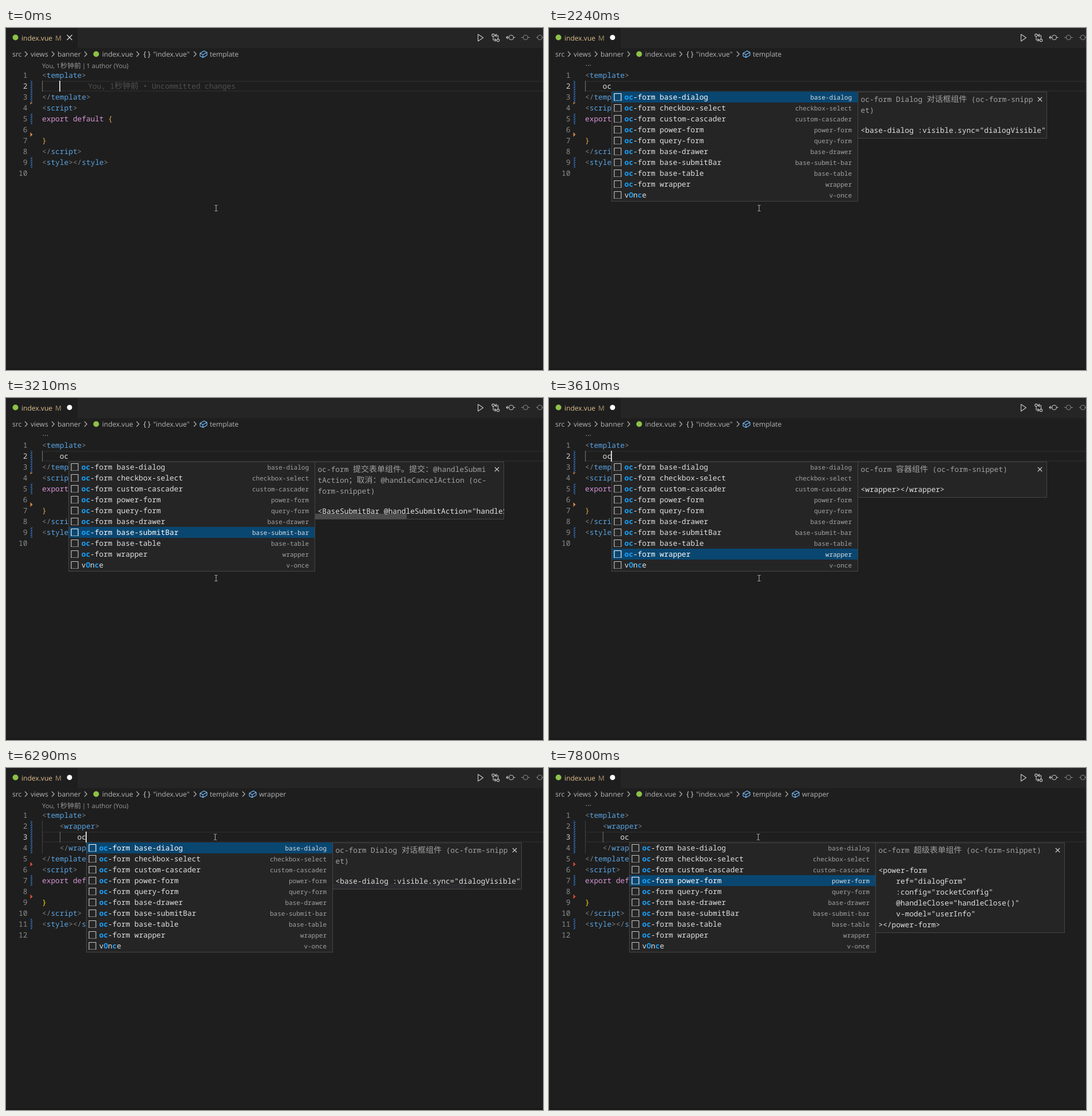
An HTML page for the animation above (8000 ms loop, 938 px wide and 597 px high).

```html
<!DOCTYPE html>
<html lang="zh">
<head>
<meta charset="utf-8">
<title>Snippet completion</title>
<style>
  html, body { margin: 0; width: 100%; height: 100%; overflow: hidden; background: #1e1e1e; }
  svg { display: block; }
  #stage { position: absolute; left: 0; top: 0; }
  text { white-space: pre; text-rendering: geometricPrecision; }
  .mono { font: 12.83px "Noto Sans Mono", "Noto Sans CJK SC", "Noto Sans CJK", monospace; }
  .mono .cjk { font-size: 14px; }
  .ui { font: 12.05px "Open Sans", "Noto Sans CJK SC", "Noto Sans CJK", sans-serif; }
  .line { fill: none; stroke-width: 1.15; stroke-linejoin: round; }
</style>
</head>
<body>
<svg id="stage" width="938" height="597" viewBox="0 0 938 597">
  <defs>
    <pattern id="hatch" width="4" height="4" patternUnits="userSpaceOnUse">
      <path d="M-1 1L1 -1M0 4L4 0M3 5L5 3" stroke="#2f74c8" stroke-width="1.4"/>
    </pattern>
  </defs>
  <g id="scene"></g>
</svg>
<script>
const LOOP = 8000, LEFT = 63, TOP = 73, ROW = 19, CHAR = 7.698;
const LIST_W = 430, PANEL_W = 331;
const GREY = '#808080', BLUE = '#5aa5e4', TEXT = '#e2e2e2', ICON = '#c5c5c5', MATCH = '#18a3ff';

const colX = col => LEFT + col * CHAR;
const rowY = line => TOP + (line - 1) * ROW;
const esc = s => s.replace(/&/g, '&amp;').replace(/</g, '&lt;').replace(/>/g, '&gt;');
const span = (s, fill, extra = '') => `<tspan fill="${fill}" ${extra}>${esc(s)}</tspan>`;
const rect = (x, y, w, h, fill, extra = '') =>
  `<rect x="${x}" y="${y}" width="${w}" height="${h}" fill="${fill}" ${extra}/>`;
const path = (d, stroke = ICON, x = 0, y = 0, extra = '') =>
  `<path class="line" d="${d}" stroke="${stroke}" transform="translate(${x} ${y})" ${extra}/>`;
const ring = (x, y, r, stroke) => `<circle class="line" cx="${x}" cy="${y}" r="${r}" stroke="${stroke}"/>`;
const disc = (x, y, r, fill) => `<circle cx="${x}" cy="${y}" r="${r}" fill="${fill}"/>`;
const rawMono = (x, y, body, extra = '') => `<text class="mono" x="${x}" y="${y}" ${extra}>${body}</text>`;
const mono = (x, y, s, fill, extra = '') => rawMono(x, y,
  esc(s).replace(/[\u3000-\u9fff\uff00-\uffef]+/g, m => `<tspan class="cjk">${m}</tspan>`),
  `fill="${fill}" ${extra}`);
const ui = (x, y, s, fill, extra = '') => `<text class="ui" x="${x}" y="${y}" fill="${fill}" ${extra}>${esc(s)}</text>`;

const SNIPPETS = ['base-dialog', 'checkbox-select', 'custom-cascader', 'power-form', 'query-form',
  'base-drawer', 'base-submitBar', 'base-table', 'wrapper'];
const WORDS = ['obj', 'object', 'ol', 'opt', 'optg', 'optgroup', 'option'];

const PANELS = [
  { doc: ['oc-form Dialog 对话框组件 (oc-form-snipp', 'et)'],
    code: ['<base-dialog :visible.sync="dialogVisible" title="">'] },
  { doc: ['oc-form 多选框组件 (oc-form-snippet)'],
    code: ['<checkbox-select v-model="checkList" :options="list">'] },
  { doc: ['oc-form 级联选择组件 (oc-form-snippet)'],
    code: ['<custom-cascader v-model="value" :options="list">'] },
  { doc: ['oc-form 超级表单组件 (oc-form-snippet)'],
    code: ['<power-form', '    ref="dialogForm"', '    :config="rocketConfig"',
      '    @handleClose="handleClose()"', '    v-model="userInfo"', '></power-form>'] },
  { doc: ['oc-form 查询表单组件 (oc-form-snippet)'],
    code: ['<query-form', '    :config="queryConfig"', '    @handleQuery="handleQuery"',
      '    v-model="queryInfo"', '></query-form>'] },
  { doc: ['oc-form 抽屉组件 (oc-form-snippet)'],
    code: ['<base-drawer :visible.sync="drawerVisible" title="">'] },
  { doc: ['oc-form 提交表单组件。提交：@handleSubmi', 'tAction；取消：@handleCancelAction (oc-', 'form-snippet)'],
    code: ['<BaseSubmitBar @handleSubmitAction="handleSubmitAction">'] },
  { doc: ['oc-form 表格组件 (oc-form-snippet)'],
    code: ['<base-table', '    ref="table"', '    :data="tableData"', '    :columns="columns"',
      '    :total="total"', '    :page.sync="page"', '    :size.sync="size"', '    :loading="loading"',
      '    @change="getList"', '    @select="onSelect"', '    border', '></base-table>'] },
  { doc: ['oc-form 容器组件 (oc-form-snippet)'], code: ['<wrapper></wrapper>'] }
];

// Each entry changes part of the state from its time on.
const TIMELINE = [
  [0, { typed: '', line: 2, col: 4, caret: 1, lens: 1, blame: 1, sel: 0, mouse: [367, 314.5], open: '#e2a94a', close: '#e2a94a' }],
  [380, { caret: 0 }],
  [920, { caret: 1 }],
  [1380, { typed: 'o', dirty: 1 }],
  [1450, { list: 1, hand: 1 }],
  [1510, { panel: 1 }],
  [1580, { typed: 'oc', hand: 0 }],
  [1720, { blame: 0 }],
  [2110, { caret: 0 }],
  [2180, { lens: 0 }],
  [2320, { sel: 1 }],
  [2460, { sel: 2, thumb: [320, '#38383a'] }],
  [2600, { sel: 3, caret: 1 }],
  [2790, { sel: 4, thumb: 0 }],
  [3000, { sel: 5 }],
  [3140, { sel: 6, caret: 0, thumb: [160, '#4b4b4c'] }],
  [3340, { sel: 7, thumb: 0 }],
  [3540, { sel: 8 }],
  [3610, { caret: 1 }],
  [4090, { list: 0, panel: 0, sel: 0, wrapped: 1, typed: '', col: 13, open: '#ffd700' }],
  [4490, { crumb: 1 }],
  [4620, { caret: 0 }],
  [5080, { caret: 1 }],
  [5220, { split: 1, line: 3, col: 8, lens: 1, blame: 1, mouse: [365.5, 120.5], close: '#ffd700' }],
  [5620, { caret: 0 }],
  [6080, { typed: 'o', caret: 1 }],
  [6150, { list: 1 }],
  [6220, { typed: 'oc', blame: 0 }],
  [6290, { panel: 1, thumb: [232, '#2b2b2d'] }],
  [6760, { caret: 0, thumb: 0 }],
  [6830, { lens: 0 }],
  [7270, { caret: 1 }],
  [7340, { sel: 1 }],
  [7580, { sel: 2 }],
  [7800, { sel: 3, caret: 0 }]
];

function crumbs(s) {
  const color = '#b4b4b4';
  const cube = x => path('M-6 -1.5L1 -5.5 6 -3V2L-1 6 -6 3.5ZM-6 -1.5L-1 1 6 -3M-1 1V6', '#75beff', x, 45.5);
  const items = [[11, 'src'], [43, 'views'], [90, 'banner'], [168, 'index.vue'], [257, '"index.vue"'], [356, 'template']];
  const chevrons = [35, 82, 139, 230, 330];
  if (s.crumb) { items.push([442, 'wrapper']); chevrons.push(415); }
  return items.map(([x, name]) => ui(x, 50, name, color)).join('') +
    chevrons.map(x => path('M-2 -4.5L2.3 0 -2 4.5', color, x, 45.5)).join('') +
    disc(157.5, 45.5, 5, '#8dc149') + mono(238.5, 49.5, '{}', ICON) +
    cube(345) + (s.crumb ? cube(431) : '');
}

function chrome(s) {
  const dim = '#858585';
  return rect(0, 0, 938, 597, '#1e1e1e') + rect(125, 0, 813, 35, '#252526') + rect(0, 594, 938, 3, '#191919') +
    disc(16.5, 16.5, 5, '#8dc149') + ui(27, 21.5, 'index.vue', '#e2c08d') +
    ui(86, 21.5, 'M', '#e2c08d', 'opacity=".75"') +
    (s.dirty ? disc(111, 16.5, 4.5, '#fff') : path('M-4.5 -4.5L4.5 4.5M4.5 -4.5L-4.5 4.5', '#e0e0e0', 111, 16.5)) +
    path('M824.5 11L833.5 17 824.5 23Z') +
    ring(851, 12.5, 2.2, ICON) + ring(859.5, 21.5, 2.2, ICON) +
    path('M851 15V21H855.5M853.5 18.5L856 21 853.5 23.5M859.5 19V13H855M857 10.5L854.5 13 857 15.5') +
    ring(882.5, 16.5, 4, ICON) + path('M878.5 16.5H874M876.5 14L874 16.5 876.5 19M886.5 16.5H889.5') +
    ring(907.5, 16.5, 4, dim) + path('M900 16.5H903.5M911.5 16.5H915', dim) +
    ring(932.5, 16.5, 4, dim) + path('M926 16.5H928.5M936.5 16.5H938', dim) + crumbs(s);
}

function sourceLines(s) {
  const body = s.split ? ['    <wrapper>', '        ' + s.typed, '    </wrapper>']
    : [s.wrapped ? '    <wrapper></wrapper>' : '    ' + s.typed];
  return ['<template>', ...body, '</template>', '<script>', 'export default {', '', '}',
    '<\/script>', '<style></style>', ''];
}

function colored(line, s) {
  const fixed = { '<': GREY, '</': GREY, '>': GREY, '{': s.open, '}': s.close,
    export: '#d695d4', default: '#d695d4', o: TEXT, oc: TEXT };
  return line.split(/(<\/?|>|\s+)/).filter(Boolean).map(t => span(t, fixed[t] || BLUE)).join('');
}

function gutter(s) {
  const bar = (from, to) => rect(43, rowY(from), 3, (to - from + 1) * ROW, 'url(#hatch)');
  const mark = (y, color) => `<path d="M42.5 ${y - 4}L46.5 ${y} 42.5 ${y + 4}Z" fill="${color}"/>`;
  return s.split
    ? bar(2, 4) + bar(7, 7) + bar(11, 11) + mark(168, '#dc4c3c') + mark(224.5, '#dc4c3c')
    : '<path d="M42.5 130H46.5L42.5 133.5Z" fill="#c98344"/>' + bar(2, 3) + bar(5, 5) + bar(9, 9) + mark(186, '#d0874a');
}

function editor(s, caretX) {
  const top = rowY(s.line);
  let out = rect(64, top + 1, 880, ROW - 2, 'none', 'stroke="#282828" stroke-width="2"');
  out += s.split
    ? rect(63, rowY(2), 1, 3 * ROW, '#404040') + rect(94, top, 1, ROW, '#707070')
    : rect(63, top, 1, ROW, '#707070');
  out += gutter(s);
  sourceLines(s).forEach((line, i) => {
    const y = rowY(i + 1) + 14, active = i + 1 === s.line;
    out += mono(37.4, y, String(i + 1), active ? '#d0d0d0' : '#8c8c8c',
      `text-anchor="end" ${active ? 'font-weight="600"' : ''}`) + rawMono(LEFT, y, colored(line, s));
  });
  const lensAttr = 'style="font-size:11.2px"';
  out += s.lens
    ? ui(63, 70, 'You, 1', '#999', lensAttr) + ui(95, 70, '秒钟前', '#999', 'style="font-size:12px"') +
      ui(133, 70, '|', '#999', lensAttr) + ui(140.5, 70, '1 author (You)', '#999', lensAttr)
    : ui(63.5, 65.5, '...', '#999', 'style="font-size:13px"');
  if (s.blame) out += mono(caretX + 49.6, top + 14, 'You, 1秒钟前 • Uncommitted changes', '#505050');
  if (s.wrapped && !s.split) out += rect(240, top, 1.5, ROW, '#7c7c7c');
  if (s.caret) out += rect(Math.floor(caretX - .5), top, 2, ROW, '#d6d6d6');
  return out;
}

function suggestions(s, x, y) {
  const items = SNIPPETS.slice(0, s.typed === 'o' ? 5 : 9).map(name => ({
    label: 'oc-form ' + name, detail: name.replace('B', '-b') }));
  if (s.typed === 'o') items.push(...WORDS.map(label => ({ label })));
  else items.push({ label: 'vOnce', detail: 'v-once' });

  let out = rect(x + .5, y + .5, LIST_W, items.length * ROW + 1, '#252526', 'stroke="#454545"');
  items.forEach(({ label, detail }, i) => {
    const top = y + i * ROW, on = i === s.sel, fill = on ? '#fff' : TEXT;
    if (on) out += rect(x + 1, top, LIST_W - 1, ROW, '#094771');
    else if (s.hand && i === 10) out += rect(x + 1, top, LIST_W - 1, ROW, '#2a2d2e');
    const iconColor = on ? '#fff' : ICON;
    out += detail
      ? path('M-6 6.5V-6H6V6.5', iconColor, x + 11, top + 9.5) +
        path('M-6 6H6', iconColor, x + 11, top + 9.5, 'stroke-dasharray="1.5 1.2"')
      : path('M3.6 -6A3.8 3.8 0 0 0 -.6 -1L-6 4.3A1.3 1.3 0 0 0 -4 6.3L1.2 .8A3.8 3.8 0 0 0 6.2 -3.6L4 -1.6 1.7 -2 1.3 -4Z', ICON, x + 11, top + 9.5);
    const hits = label === 'vOnce' ? [1, 3] : [...s.typed].map((_, k) => k);
    out += rawMono(x + 22.7, top + 14, [...label].map((c, k) =>
      hits.includes(k) ? span(c, MATCH, 'font-weight="700"') : span(c, fill)).join(''));
    if (detail) out += mono(x + LIST_W - 10, top + 13.5, detail, on ? '#d4dde4' : '#a2a2a2', 'text-anchor="end" style="font-size:11px"');
  });
  return out;
}

function details(s, x, y) {
  const { doc, code } = PANELS[s.sel];
  const codeTop = 18 + doc.length * ROW + 16;
  const height = codeTop + (code.length - 1) * ROW + 10;
  const body = doc.map((l, i) => mono(5.5, 18 + i * ROW, l, '#a2a2a2')).join('') +
    code.map((l, i) => mono(5.5, codeTop + i * ROW, l, TEXT)).join('');
  const thumb = s.thumb ? rect(1, height - 10, s.thumb[0], 9, s.thumb[1]) : '';
  return `<svg x="${x}" y="${y}" width="${PANEL_W}" height="${height}">` +
    rect(.5, .5, PANEL_W - 1, height - 1, '#252526', 'stroke="#454545"') + thumb + body +
    path('M-3.7 -3.7L3.7 3.7M3.7 -3.7L-3.7 3.7', TEXT, 318.5, 13.5) + '</svg>';
}

function pointer(s) {
  const [x, y] = s.mouse;
  return s.hand
    ? `<path d="M-2.5 -7Q-1.5 -8 -.5 -7V-2.5L3.8 -1.5Q5 -1 4.8 .5L4 4V6.5H-1.5V5L-4.8 .8Q-4.8 -1 -2.5 .5Z" fill="#fff" stroke="#111" stroke-width=".7" transform="translate(${x} ${y + 7})"/>`
    : path('M-2.5 -5H-.7L0 -4.5 .7 -5H2.5M0 -4.5V4.5M-2.5 5H-.7L0 4.5 .7 5H2.5', '#b4b4b4', x, y, 'style="stroke-width:1"');
}

function render(s) {
  const caretX = colX(s.col + s.typed.length);
  const x = Math.round(caretX), y = rowY(s.line + 1);
  return chrome(s) + editor(s, caretX) +
    (s.list ? suggestions(s, x, y) : '') +
    (s.panel ? details(s, x + LIST_W, y) : '') + pointer(s);
}

const scene = document.getElementById('scene');
let shown = -1;
function frame() {
  const t = performance.now() % LOOP;
  const past = TIMELINE.filter(([at]) => at <= t);
  if (past.length !== shown) {
    shown = past.length;
    scene.innerHTML = render(Object.assign({}, ...past.map(([, change]) => change)));
  }
  requestAnimationFrame(frame);
}
frame();
</script>
</body>
</html>
```
